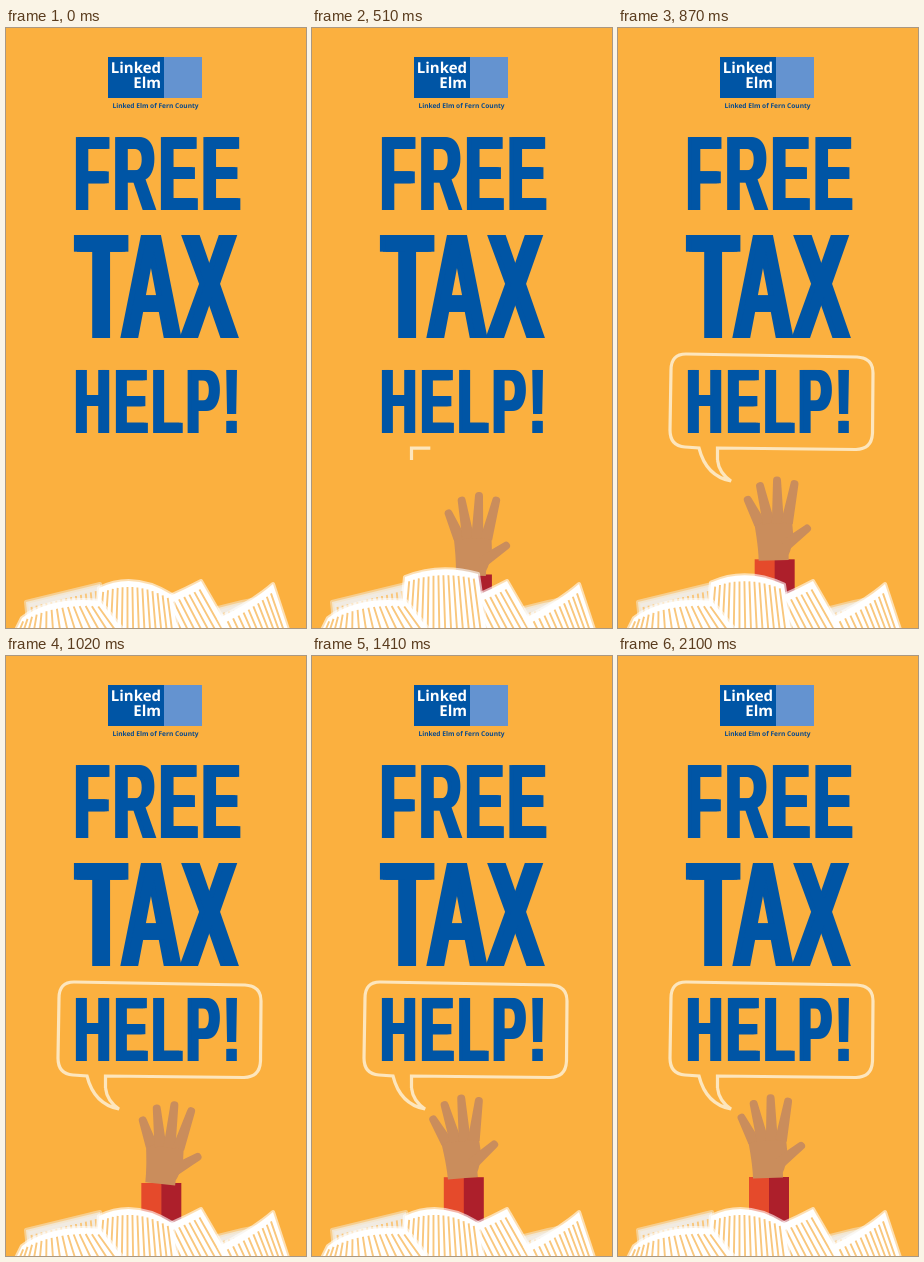
An HTML page for the animation above (2.4 s loop, 300 by 600 pixels).

```html
<!DOCTYPE html>
<html lang="en">
<head>
<meta charset="utf-8">
<title>Free tax help</title>
<style>
  html, body { margin: 0; width: 100%; height: 100%; overflow: hidden; background: #fbb03f; }
  svg { display: block; width: 100vw; height: 100vh; text-rendering: geometricPrecision; }
  .brand { font-family: "Open Sans", "Noto Sans", sans-serif; font-weight: 700; }
  .headline { font-family: "Liberation Sans", Arial, sans-serif; font-weight: 700; fill: #0055a5; }
  .sheet { fill: #fff; stroke: #fff; stroke-opacity: .6; stroke-width: 4; stroke-linejoin: round; }
  .shade { fill: #f1ebe2; stroke: #f6e3c4; }
  .rows { fill: none; stroke: #f9c77d; stroke-width: 1.9; }
</style>
</head>
<body>
<svg viewBox="0 0 300 600" xmlns="http://www.w3.org/2000/svg">
  <rect width="300" height="600" fill="#fbb03f"/>

  <g class="brand">
    <rect x="102" y="29" width="56" height="41" fill="#0055a5"/>
    <rect x="158" y="29" width="38" height="41" fill="#6493d0"/>
    <g fill="#fff" font-size="15" text-anchor="end">
      <text x="155" y="45">Linked</text>
      <text x="155" y="60">Elm</text>
    </g>
    <text x="149.5" y="80" font-size="6.6" fill="#0a4a8c" text-anchor="middle">Linked Elm of Fern County</text>
  </g>

  <g id="headline" class="headline"></g>

  <path id="bubble" fill="none" stroke="#fde6bd" stroke-width="3.2" pathLength="100"
    d="M99.5 432 V420 L238 421.5 Q254 421 254.500 405 L255 345 Q255 330 239 329 L68 326
       Q53 326 53 342 L52 402 Q52 418 67 419 L81 420 Q88 448 113 453 Q101 445 99.500 432"/>

  <g id="back"></g>
  <g id="arm">
    <rect x="-20" width="20.5" height="170" fill="#e54a2b"/>
    <rect width="20" height="170" fill="#ad1f2b"/>
    <g id="hand" fill="#ca8d5c">
      <path d="M-20 -39 Q-2 -48 18 -41 L19 -26 Q18 -12 14 -4 V1 H-16 Q-16 -14 -20 -39Z"/>
    </g>
  </g>
  <g id="front"></g>
</svg>
<script>
const LOOP = 2400, HOLD = 2100, STEP = 30;
const NS = "http://www.w3.org/2000/svg";
const $ = id => document.getElementById(id);

function add(parent, tag, attrs, text) {
  const el = document.createElementNS(NS, tag);
  for (const name in attrs) el.setAttribute(name, attrs[name]);
  if (text) el.textContent = text;
  return parent.appendChild(el);
}

// Condensed heavy lettering: narrow glyphs, thickened sideways only.
const NARROW = 0.55, WEIGHT = 0.04;
function headline(word, size, x, baseline, spacing) {
  const id = word.toLowerCase().replace("!", "");
  add($("headline"), "text", {
    id, "font-size": size, "letter-spacing": spacing,
    transform: `translate(${x} ${baseline}) scale(${NARROW} 1)`
  }, word);
  for (const shift of [-0.5, 0.5])
    add($("headline"), "use", { href: "#" + id, x: shift * WEIGHT * size });
}
headline("FREE", 106, 68, 182, 6.7);
headline("TAX", 149.7, 70, 310, 2);
headline("HELP!", 91.6, 68.4, 405, 6.6);

// A tapered finger from its root to a round tip.
function finger(x, y, tipX, tipY) {
  const length = Math.hypot(tipX - x, tipY - y);
  const angle = Math.atan2(tipX - x, y - tipY) * 180 / Math.PI;
  add($("hand"), "path", {
    transform: `translate(${x} ${y}) rotate(${angle})`,
    d: `M-6 0 L-4 ${-length} A4 4 0 0 1 4 ${-length} L6 0Z`
  });
}
for (let i = 0; i < 4; i++) {
  const angle = (-23 + 13 * i) * Math.PI / 180;
  const reach = 79 - 2.6 * (i - 2.3) ** 2;
  finger(-14 + 9 * i, -36, reach * Math.sin(angle), -reach * Math.cos(angle));
}
finger(10, -13, 33, -30);

const mix = (a, b, p) => a + (b - a) * p;
const bend = (a, c, b, p) => mix(mix(a, c, p), mix(c, b, p), p);

// A page with a curved top edge a-c-b, its sides and printed lines fanning from one lean to another.
function shapeSheet(group, [ax, ay], [cx, cy], [bx, by], leanA, leanB) {
  const depth = 60, gap = 5, margin = 6;
  const [page, rows] = group.children;
  page.setAttribute("d", `M${ax} ${ay} Q${cx} ${cy} ${bx} ${by}
    l${leanB * depth} ${depth} L${ax + leanA * depth} ${ay + depth}Z`);
  const count = Math.round((bx - ax) / gap);
  let d = "";
  for (let i = 1; i < count; i++) {
    const p = i / count, lean = mix(leanA, leanB, p);
    const x = bend(ax, cx, bx, p) + lean * margin;
    d += `M${x} ${bend(ay, cy, by, p) + margin} l${lean * depth} ${depth}`;
  }
  rows.setAttribute("d", d);
}

function sheet(layer, shade = "") {
  const group = add($(layer), "g", {});
  add(group, "path", { class: "sheet " + shade });
  add(group, "path", { class: "rows" });
  return group;
}
shapeSheet(sheet("back", "shade"), [20, 574], [57, 565], [94, 556], 0.1, 0.1);
shapeSheet(sheet("back", "shade"), [212, 580], [237, 573], [263, 569], 0.15, 0.15);
shapeSheet(sheet("front"), [128, 582], [163, 570], [195, 553], 0.4, 0.58);
shapeSheet(sheet("front"), [213, 590], [245, 575], [267, 556], 0.5, 0.33);
const flap = sheet("front");
shapeSheet(sheet("front"), [16, 590], [45, 568], [94, 573], -0.5, 0.8);

const ramp = (t, from, to) => Math.min(1, Math.max(0, (t - from) / (to - from)));
const ease = (t, from, to) => {
  const p = ramp(t, from, to);
  return p * p * (3 - 2 * p);
};

function render(t) {
  const settle = 1.5 * (1 - ramp(t, 0, 1500));
  const x = 151 + 9 * settle;
  const y = 521 + 26 * Math.min(1, settle) ** 2 + 115 * (1 - ease(t, 240, 480));
  const wave = 1 - 7 * Math.cos((t - 720) / 760 * 2 * Math.PI);
  $("arm").setAttribute("transform", `translate(${x} ${y})`);
  $("hand").setAttribute("transform", `rotate(${wave})`);

  const lift = ease(t, 300, 450) - ease(t, 780, 960);
  shapeSheet(flap, [93, 560 - 11 * lift], [128, 543 - 8 * lift], [166, 567 - 21 * lift], -0.1, 0.15);

  const drawn = 100 * ramp(t, 500, 705);
  $("bubble").setAttribute("stroke-dasharray", `${drawn} 200`);
  $("bubble").setAttribute("visibility", drawn > 0 ? "visible" : "hidden");
}

const start = performance.now();
function tick() {
  const t = (performance.now() - start) % LOOP;
  render(Math.min(HOLD, Math.floor(t / STEP) * STEP));
  requestAnimationFrame(tick);
}
tick();
</script>
</body>
</html>
```
